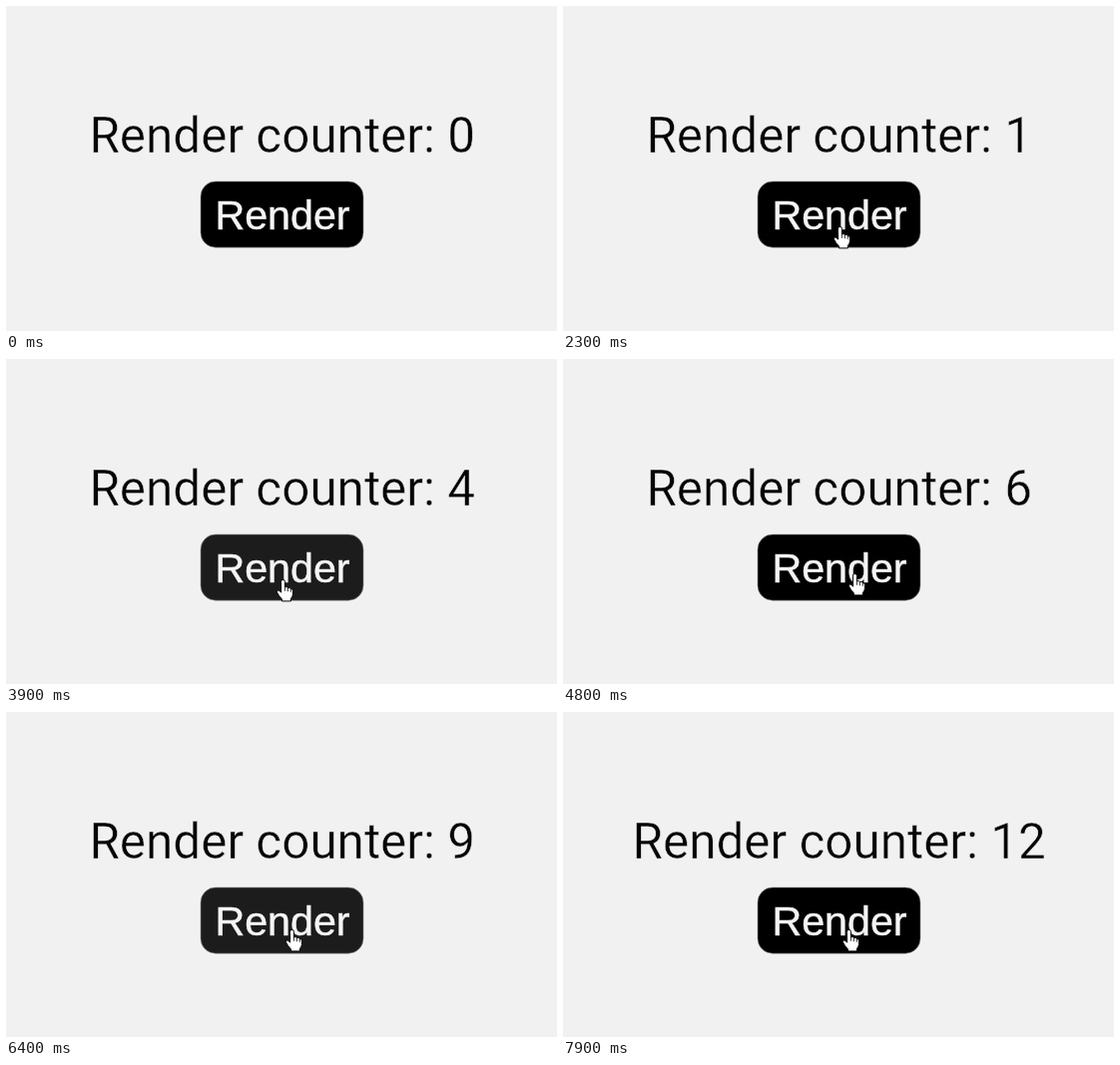
These frames come from a looping animation (552 by 326 pixels, 8 s). An HTML page:

```html
<!DOCTYPE html>
<html lang="en">
<head>
<meta charset="utf-8">
<title>Render counter</title>
<style>
  html, body { margin: 0; width: 100%; height: 100%; overflow: hidden; background: #f1f1f1; }
  svg { display: block; width: 552px; height: 326px; }
  text { text-anchor: middle; }
  #label { font: 400 49.4px Roboto, sans-serif; fill: #050505; stroke: #f1f1f1; stroke-width: .5px; }
  #caption { font: 400 41.2px "Liberation Sans", Arial, sans-serif; fill: #f4f4f4; stroke: #f4f4f4; stroke-width: .5px; }
  #button { stroke: #888; stroke-width: .6px; }
  #cursor path { stroke: #000; stroke-linejoin: round; stroke-linecap: round; }
</style>
</head>
<body>
<svg viewBox="0 0 552 326">
  <rect width="552" height="326" fill="#f1f1f1"/>
  <text id="label" x="276.7" y="147">Render counter: 0</text>
  <rect id="button" x="195" y="176" width="163" height="66.2" rx="15"/>
  <text id="caption" x="277" y="224">Render</text>
  <g id="cursor">
    <g id="hand">
      <path fill="#fff" d="M-2 2Q-2 0 0 0Q2 0 2 2V7.5Q4 6.5 5 8.2Q7 7.4 7.8 9.2Q10 8.6 10 11V15Q9.5 17.5 8 19V21.5H-1V19.5Q-4 16.5-6 12.5Q-6.5 10.5-4.5 10.5Q-3 11-2 12.5Z"/>
      <path fill="none" stroke-width=".8" d="M2 8V11M5 8.5V11.5M7.8 9.5V12"/>
    </g>
    <path id="arrow" fill="#fff" d="M0 0V17.5L4 13.8L6.8 20L9.6 18.8L6.8 12.8H12.2Z"/>
  </g>
</svg>
<script>
  const LOOP = 8000, STEP = 100, CLICKS = 12;
  const EDGE = 242; // lower edge of the button
  const el = id => document.getElementById(id);
  const label = el("label"), button = el("button"), cursor = el("cursor");
  const hand = el("hand"), arrow = el("arrow");

  // Clicks come every 400 ms at first, then settle to every 500 ms
  const release = i => Math.max(2300 + 400 * i, 2000 + 500 * i);
  const releases = Array.from({ length: CLICKS }, (_, i) => release(i));

  const ramp = (t, from, to) => Math.min(1, Math.max(0, (t - from) / (to - from)));
  const ease = (t, from, to) => {
    const u = ramp(t, from, to);
    return u * u * (3 - 2 * u);
  };

  // The pointer rises onto the button, then drifts a little between clicks
  function pointerAt(t) {
    const enter = 1 - ramp(t, 1200, 2000);
    const right = ease(t, 4000, 4700), back = ease(t, 5000, 5700);
    const lift = ease(t, 6500, 7000) - ease(t, 7300, 7800);
    return {
      x: 277.4 + 13 * enter + 15 * right - 6 * back - 5 * lift,
      y: 221.4 + 110 * enter - 6 * right + 3 * back - 28 * lift
    };
  }

  const show = (node, on) => { node.style.display = on ? "" : "none"; };

  function draw(now) {
    const t = Math.floor((now % LOOP) / STEP) * STEP;
    const pressed = releases.some(r => t >= r - STEP && t < r);
    label.textContent = "Render counter: " + releases.filter(r => r <= t).length;
    button.setAttribute("fill", pressed ? "#1c1c1c" : "#000");

    const { x, y } = pointerAt(t);
    cursor.setAttribute("transform", `translate(${x} ${y})`);
    show(hand, y < EDGE);
    show(arrow, y >= EDGE);
  }

  let start;
  function tick(now) {
    start ??= now;
    draw(now - start);
    requestAnimationFrame(tick);
  }
  draw(0);
  requestAnimationFrame(tick);
</script>
</body>
</html>
```
